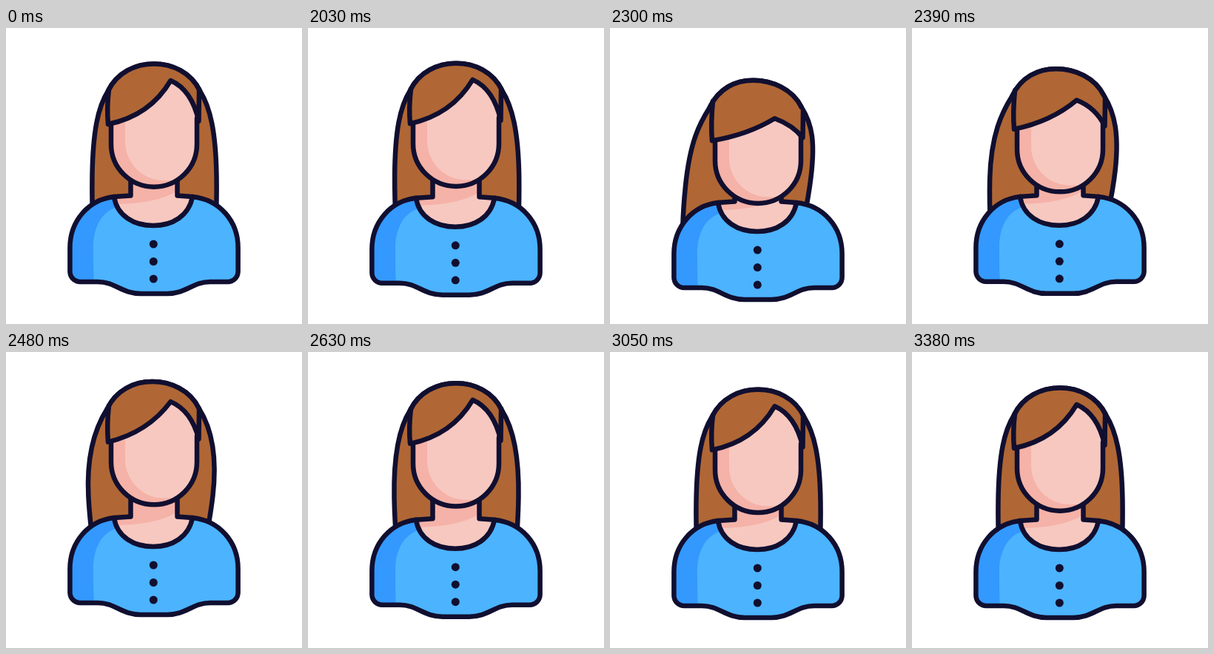
An HTML page that plays this animation: 400x400 px, repeating every 3.41 s.

```html
<!DOCTYPE html>
<html lang="en">
<head>
<meta charset="utf-8">
<title>Nodding avatar</title>
<style>
  html, body { margin: 0; width: 100%; height: 100%; overflow: hidden; background: #fff; }
  svg { display: block; width: 100vw; height: 100vh; }
  .line { fill: none; stroke: #110f30; stroke-width: 6.5; stroke-linecap: round; stroke-linejoin: round; }
  .hair { fill: #b06735; }
  .skin { fill: #f7c8c0; }
  .shade { fill: #f5b2a8; }
  .shirt { fill: #4cb3fe; }
  .shirt-dark { fill: #3399ff; }
  .ink { fill: #110f30; }
</style>
</head>
<body>
<svg viewBox="0 0 400 400">
  <defs>
    <path id="top" d="M146 228C111 232 86.400 261 86.400 297V329A14 14 0 0 0 100.400 343H124C148 343 156 359 182 359H218C244 359 252 343 276 343H299.600A14 14 0 0 0 313.600 329V297C313.600 261 289 232 252 228C247 254 225 267 199 267S150 254 146 228Z"/>
  </defs>
  <path id="back" class="line" style="fill:#b06735"/>
  <g id="body">
    <path class="skin" d="M168 190V226H147C150 254 174 267 199 267S247 254 251 226H232V190Z"/>
    <path class="shade" d="M168 190V226H147L151 238Q204 237 232 220V190Z"/>
    <use href="#top" class="shirt"/>
    <path class="shirt-dark" d="M146 228C111 232 86.400 261 86.400 297V329A14 14 0 0 0 100.400 343H119Q118 335 118 297C118 268 130 247 151 242Z"/>
    <use href="#top" class="line"/>
    <path class="line" d="M168.500 195V226.500L146 228M231.500 195V226.500L252 228"/>
    <g id="buttons" class="ink"></g>
  </g>
  <g id="head">
    <path class="skin" d="M142 110A58 55 0 0 1 258 110V157A58 57.700 0 0 1 142 157Z"/>
    <path class="shade" d="M142 110H161V153A52 53 0 0 0 213 206H230A58 57.700 0 0 1 142 157Z"/>
    <path class="line" d="M142 122V157A58 57.700 0 0 0 258 157V122"/>
  </g>
  <path id="fringe" class="hair"/>
  <path id="edge" class="line"/>
  <path id="dome" class="line"/>
</svg>
<script>
const LOOP = 3410, REST = 2000, STEP = 30, HAIR_END = 270;
const el = id => document.getElementById(id);
const set = (id, name, value) => el(id).setAttribute(name, value);

el("buttons").innerHTML = [0, 1, 2]
  .map(i => `<circle cx="199.3" cy="${292 + 23.5 * i}" r="5.5"/>`).join("");

// Smooth swing from rest through a few [step, value] points, flat at each turn
function swing(...points) {
  const keys = [[0, 0], ...points], last = keys.length - 1;
  const slope = i => (keys[i + 1][1] - keys[i][1]) / (keys[i + 1][0] - keys[i][0]);
  const tangent = keys.map((_, i) => {
    if (i === 0 || i === last) return 0;
    const a = slope(i - 1), b = slope(i);
    return a * b > 0 ? 2 * a * b / (a + b) : 0;
  });
  return n => {
    const i = keys.findIndex(k => k[0] > n) - 1;
    if (i < 0) return keys[last][1];
    const [x, p] = keys[i], [x2, q] = keys[i + 1];
    const w = x2 - x, t = (n - x) / w, s = t * t * (3 - 2 * t);
    return p + (q - p) * s
      + w * t * (1 - t) * ((1 - t) * tangent[i] - t * tangent[i + 1]);
  };
}

const bodyY = swing([5, 17.2], [16, -4], [24, 0]);
const headY = swing([1, -0.8], [5, 19], [8.3, 25.5], [17.5, -11], [27, 4.7], [43, 0]);
const tipY = swing([5, -3], [10, 29], [18, 0]);
const sway = swing([5, 6.5], [10, -14.5], [20, 0]);
const taper = swing([5, 4], [10, 2.5], [16, 9], [24, 0]);

// Control points of one side: dir is -1 for left, 1 for right
function lock(dir, y, my, s, pinch) {
  const x = 200 + dir * 62 + s * 0.22;
  const mx = 200.5 + dir * 84 + s;
  const end = 200.5 + dir * (83 - pinch) + s * 1.5;
  const k = 0.85 * (end - mx) / (HAIR_END - my) + 0.15 * (mx - x) / (my - y);
  return {
    x, mx, end,
    crown: [x - dir * 12, y - 25],
    side: [x + dir * 14, y + 22],
    over: [mx - k * 60, my - 60],
    under: [mx + k * 30, my + 30],
  };
}

function draw(n) {
  const h = headY(n), s = sway(n), tip = tipY(n);
  set("body", "transform", `translate(0 ${bodyY(n)})`);
  set("head", "transform", `translate(0 ${h})`);

  // Back hair
  const y = 85 + h, top = 48.5 + h, my = 200 + 0.6 * h, apex = s * 0.45;
  const L = lock(-1, y, my, s, taper(n)), R = lock(1, y, my, s, taper(n));
  const arch = `C${L.crown} ${175 + apex} ${top} ${200 + apex} ${top}S${R.crown} ${R.x} ${y}`;
  set("back", "d", `M${L.end} ${HAIR_END}Q${L.under} ${L.mx} ${my}`
    + `C${L.over} ${L.side} ${L.x} ${y}${arch}`
    + `C${R.side} ${R.over} ${R.mx} ${my}Q${R.under} ${R.end} ${HAIR_END}`);
  set("dome", "d", `M${L.x} ${y}${arch}`);

  // Fringe: its sweep flattens as the hair swings
  const sag = 18 * (1 - Math.abs(s) / 24);
  const tx = 222.5, ty = 71 + h + tip, foot = 130 + h;
  const ly = y - 2 + apex, ry = y - 2 - apex;
  const sweep = `M139 ${ly}Q136 ${108 + h} 138 ${foot}`
    + `Q${(138 + tx) / 2 + sag * 0.8} ${(foot + ty) / 2 + sag} ${tx} ${ty}`
    + `Q${251 - tip * 0.15} ${83.5 + h + tip * 0.87} 260.5 ${126 + h}L261 ${ry}`;
  set("edge", "d", sweep);
  set("fringe", "d", `${sweep}C${R.crown} ${225 + apex} ${top} ${200 + apex} ${top}`
    + `S${L.crown} 139 ${ly}Z`);
}

function frame() {
  const t = performance.now() % LOOP;
  draw(Math.max(0, Math.floor((t - REST) / STEP)));
  requestAnimationFrame(frame);
}
frame();
</script>
</body>
</html>
```
